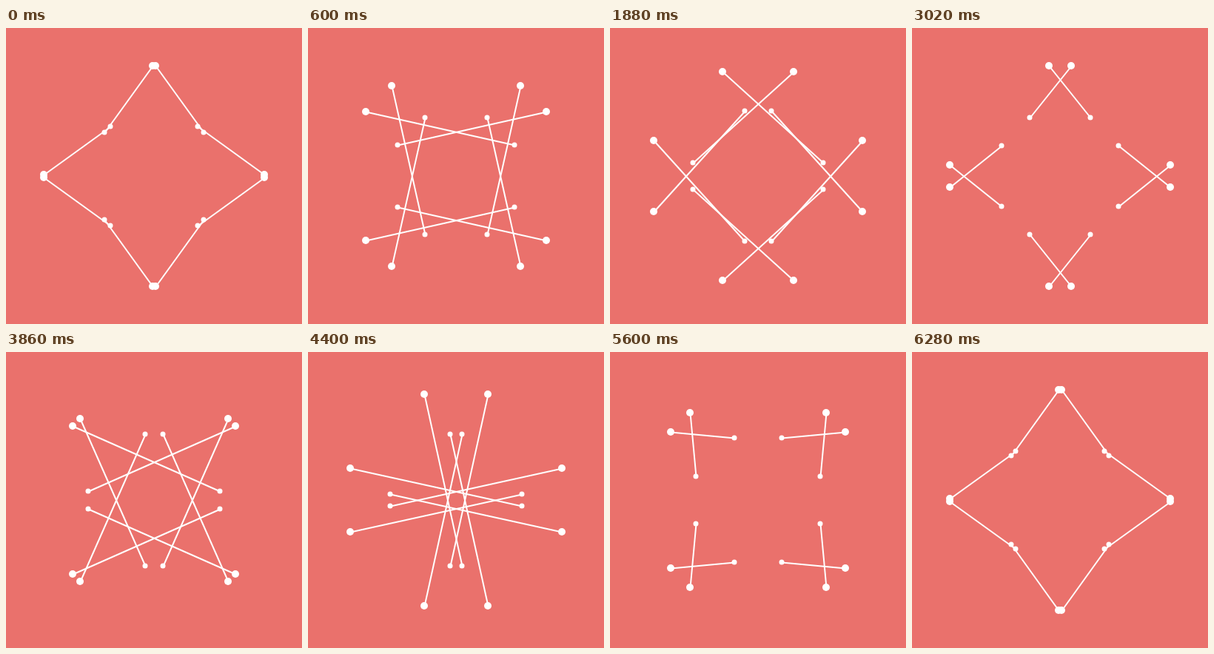
Recreate the animation shown at these times as an HTML page with a canvas. Size 400 by 400 pixels, loop 6.3 s.

```html
<!DOCTYPE html>
<html lang="en">
<head>
<meta charset="utf-8">
<title>Turning sticks</title>
<style>
  html, body { margin: 0; width: 100%; height: 100%; overflow: hidden; background: #ea716c; }
  canvas { display: block; width: 400px; height: 400px; }
</style>
</head>
<body>
<canvas id="stage" width="400" height="400"></canvas>
<script>
const ctx = document.getElementById('stage').getContext('2d');
const STEP = 20, STEPS = 315, CENTER = 200;
const start = performance.now();

// Whole-pixel offset from the centre, angle measured from straight up
function polar(radius, angle) {
  return [Math.trunc(radius * Math.sin(angle)), Math.trunc(-radius * Math.cos(angle))];
}

function turn([x, y], quarters, mirror) {
  if (mirror) x = -x;
  for (let i = 0; i < quarters; i++) [x, y] = [-y, x];
  return [CENTER + x, CENTER + y];
}

function dot([x, y], radius) {
  ctx.beginPath();
  ctx.arc(x, y, radius, 0, Math.PI * 2);
  ctx.fill();
}

// Strokes run through pixel centres, dots sit on pixel corners
function line([x1, y1], [x2, y2]) {
  ctx.beginPath();
  ctx.moveTo(x1 + 0.5, y1 + 0.5);
  ctx.lineTo(x2 + 0.5, y2 + 0.5);
  ctx.stroke();
}

function draw(time) {
  const n = Math.floor(time / STEP + 0.01) % STEPS + 1;
  const outer = polar(150, 0.02 * n);
  const inner = polar(90, Math.PI / 4 + 0.06 * n);

  ctx.fillStyle = '#ea716c';
  ctx.fillRect(0, 0, 400, 400);
  ctx.fillStyle = ctx.strokeStyle = '#fff';
  ctx.lineWidth = 2;
  for (let q = 0; q < 4; q++) {
    for (const mirror of [false, true]) {
      const a = turn(outer, q, mirror), b = turn(inner, q, mirror);
      line(a, b);
      dot(a, 5);
      dot(b, 3.5);
    }
  }
}

function tick() {
  draw(Math.max(0, performance.now() - start));
  requestAnimationFrame(tick);
}
tick();
</script>
</body>
</html>
```
